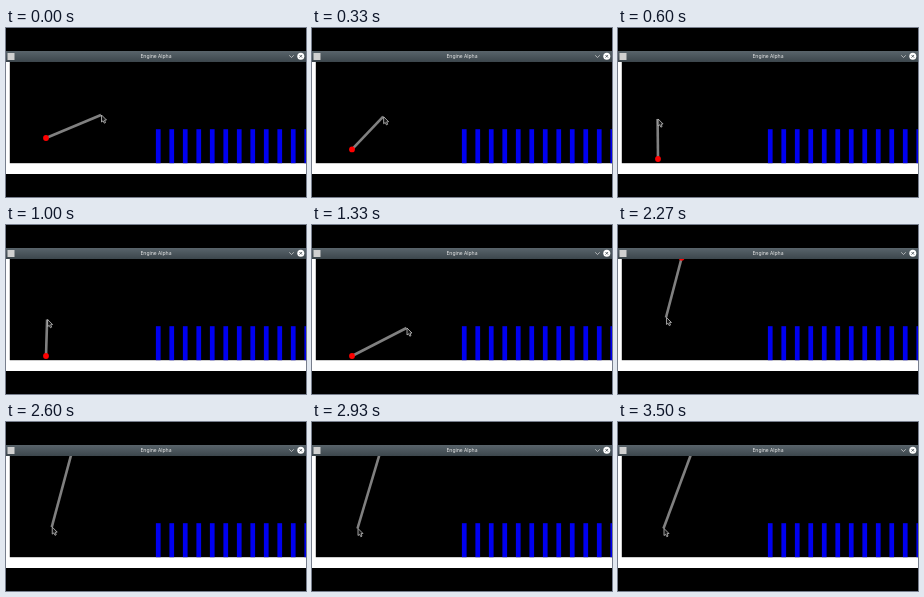
Animation of 300x169 px, one loop 3530 ms. Source, as an HTML page with a canvas:

```html
<!DOCTYPE html>
<html lang="en">
<head>
<meta charset="utf-8">
<title>Engine Alpha</title>
<style>
html, body { margin: 0; width: 100%; height: 100%; overflow: hidden; background: #000; }
canvas { display: block; width: 300px; height: 169px; }
</style>
</head>
<body>
<canvas id="stage"></canvas>
<script>
const LOOP = 3530, STEP = 100 / 3;
const FLOOR = 131, LAUNCH = 1855, GRAVITY = 0.000067;
const canvas = document.getElementById('stage');
const ctx = canvas.getContext('2d');
const dpr = window.devicePixelRatio || 1;
canvas.width = Math.round(300 * dpr);
canvas.height = Math.round(169 * dpr);
ctx.scale(dpr, dpr);

// Each pointer move eases to its end and rests there
const moves = [
  { from: 0, to: 850, x: 25, y: 92 },
  { from: 850, to: 1330, x: 94.5, y: 103 },
  { from: 1330, to: 1720, x: 50, y: 81 },
  { from: 1870, to: 2720, x: 45.5, y: 106.5 }
];

function pointerAt(t) {
  const p = { x: 95, y: 87 };
  for (const m of moves) {
    const u = Math.min(1, Math.max(0, (t - m.from) / (m.to - m.from)));
    const e = u * u * (3 - 2 * u);
    p.x += (m.x - p.x) * e;
    p.y += (m.y - p.y) * e;
  }
  return p;
}

// The ball drops to the floor, then flies off as a projectile
function ballAt(t) {
  if (t < LAUNCH) {
    return { x: 40, y: Math.min(FLOOR, 110 + 0.012 * t + GRAVITY * t * t) };
  }
  const s = t - LAUNCH;
  return { x: 41 + 0.055 * s, y: FLOOR - 0.266 * s + GRAVITY * s * s };
}

function rect(color, x, y, w, h) {
  ctx.fillStyle = color;
  ctx.fillRect(x, y, w, h);
}

function disc(color, x, y, r) {
  ctx.fillStyle = color;
  ctx.beginPath();
  ctx.arc(x, y, r, 0, Math.PI * 2);
  ctx.fill();
}

function stroke(color, width, ...pts) {
  ctx.strokeStyle = color;
  ctx.lineWidth = width;
  ctx.beginPath();
  pts.forEach(([x, y]) => ctx.lineTo(x, y));
  ctx.stroke();
}

function drawWindow() {
  rect('#000', 0, 0, 300, 169);
  rect('#fff', 0, 34, 300, 112);
  rect('#000', 3.8, 34, 296.2, 101.2);
  const bar = ctx.createLinearGradient(0, 23, 0, 34);
  bar.addColorStop(0, '#59646b');
  bar.addColorStop(1, '#3c464c');
  rect(bar, 0, 23, 300, 11);
  rect('#d0d0d0', 1.5, 25, 7, 7);
  ctx.fillStyle = '#e8e8e8';
  ctx.font = '5px "Noto Sans", sans-serif';
  ctx.textAlign = 'center';
  ctx.textBaseline = 'alphabetic';
  ctx.fillText('Engine Alpha', 150, 30.2);
  stroke('#ddd', 0.7, [283.2, 27.3], [285.5, 29.5], [287.8, 27.3]);
  disc('#fff', 294.8, 28.3, 3.5);
  stroke('#3c464c', 0.8, [293.5, 27], [296.1, 29.6]);
  stroke('#3c464c', 0.8, [296.1, 27], [293.5, 29.6]);
  for (let i = 0; i < 12; i++) rect('#0000f0', 149.9 + i * 13.5, 101.2, 4.7, 34);
}

function drawPointer({ x, y }) {
  ctx.save();
  ctx.translate(x + 0.5, y);
  const arrow = new Path2D('M0 0V7L1.6 5.8L2.8 8.2L4 7.6L3 5.2L5 5Z');
  ctx.fillStyle = '#151515';
  ctx.fill(arrow);
  ctx.strokeStyle = '#c4c4c4';
  ctx.lineWidth = 0.8;
  ctx.stroke(arrow);
  ctx.restore();
}

function draw(now) {
  const t = Math.floor((now % LOOP + 7) / STEP) * STEP;
  const ball = ballAt(t), tip = pointerAt(t);
  drawWindow();
  ctx.save();
  ctx.beginPath();
  ctx.rect(4, 34, 296, 101);
  ctx.clip();
  stroke('#808080', 2.6, [ball.x, ball.y], [tip.x, tip.y]);
  disc('#f00', ball.x, ball.y, 2.9);
  drawPointer(tip);
  ctx.restore();
}

const start = performance.now();
function tick() {
  draw(performance.now() - start);
  requestAnimationFrame(tick);
}
tick();
</script>
</body>
</html>
```
